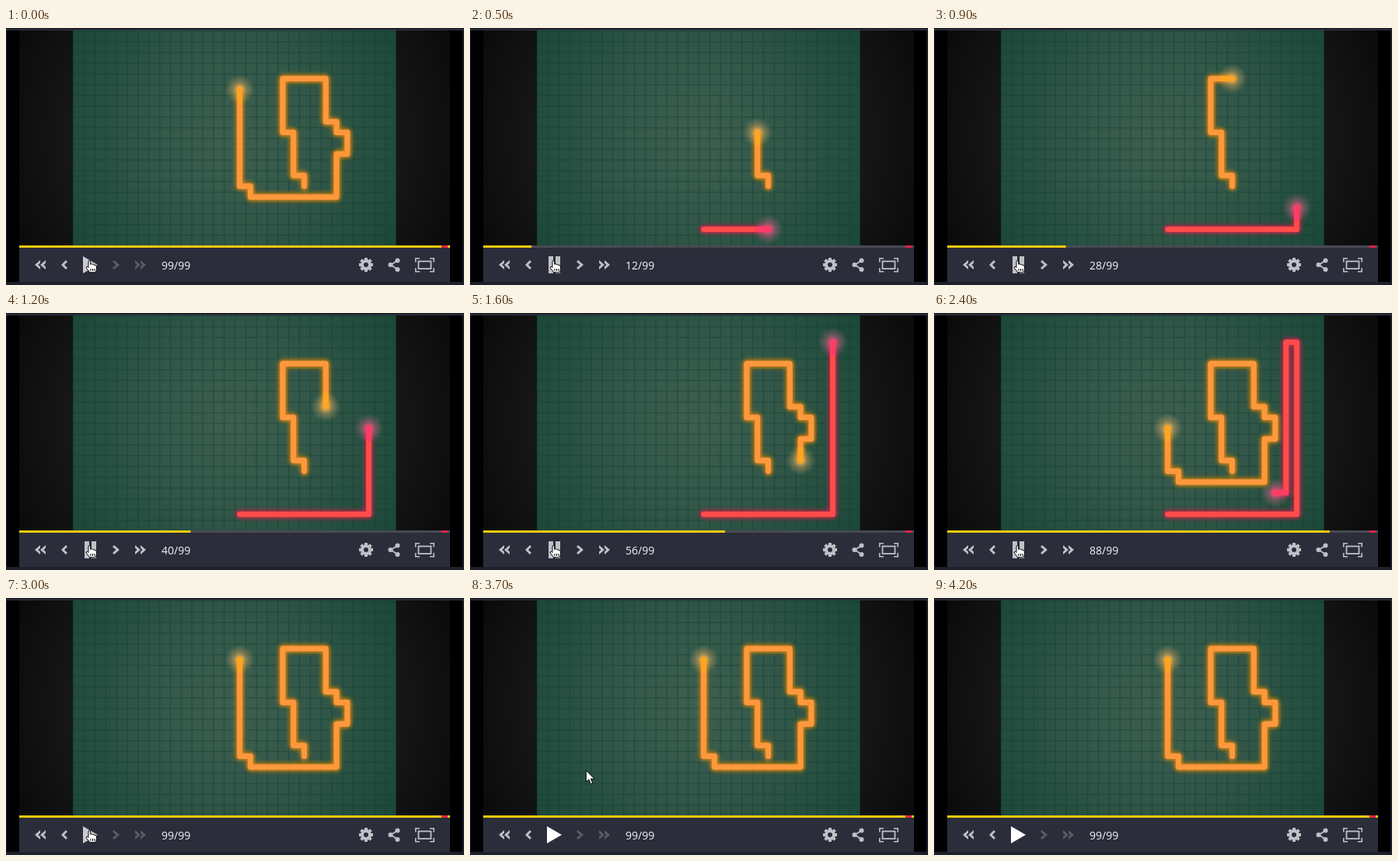
Recreate the animation shown at these times as an HTML page. Size 589 by 331 pixels, loop 4.6 s.

```html
<!DOCTYPE html>
<html lang="en">
<head>
<meta charset="utf-8">
<title>Light trails replay</title>
<style>
  html, body { margin: 0; width: 100%; height: 100%; overflow: hidden; background: #1d1f29; }
  svg { display: block; width: 589px; height: 331px; }
  text { font: 14px "Open Sans", "Noto Sans", sans-serif; fill: #f4f4f6; }
  .trail { fill: none; stroke-width: 7; stroke-linecap: round; stroke-linejoin: round; }
</style>
</head>
<body>
<svg viewBox="0 0 589 331" xmlns="http://www.w3.org/2000/svg">
  <defs>
    <radialGradient id="board" gradientUnits="userSpaceOnUse" cx="293" cy="141" r="250">
      <stop offset="0" stop-color="#3d5f50"/>
      <stop offset=".45" stop-color="#325748"/>
      <stop offset="1" stop-color="#1b4839"/>
    </radialGradient>
    <radialGradient id="wings" gradientUnits="userSpaceOnUse" cx="293" cy="141" r="300">
      <stop offset=".65" stop-color="#191919"/>
      <stop offset="1" stop-color="#0b0b0b"/>
    </radialGradient>
    <pattern id="cells" patternUnits="userSpaceOnUse" x="86" y="3" width="13.84" height="13.85">
      <path d="M0 .8H13.84M.8 0V13.85" stroke="#0d3b30" stroke-opacity=".42" stroke-width="1.6"/>
    </pattern>
    <radialGradient id="haloA">
      <stop offset="0" stop-color="#ffc45c" stop-opacity=".8"/>
      <stop offset=".45" stop-color="#ecb668" stop-opacity=".4"/>
      <stop offset="1" stop-color="#d8b070" stop-opacity="0"/>
    </radialGradient>
    <radialGradient id="haloB">
      <stop offset="0" stop-color="#ff5c8c" stop-opacity=".8"/>
      <stop offset=".45" stop-color="#e66890" stop-opacity=".4"/>
      <stop offset="1" stop-color="#c87088" stop-opacity="0"/>
    </radialGradient>
    <filter id="blur" filterUnits="userSpaceOnUse" x="17" y="3" width="554" height="277">
      <feGaussianBlur stdDeviation="2.8"/>
    </filter>
    <clipPath id="view"><rect x="17" y="3" width="554" height="277"/></clipPath>
  </defs>

  <rect width="589" height="331" fill="#1d1f29"/>
  <rect y="2" width="589" height="1" fill="#363945"/>
  <rect x="1" y="3" width="586" height="324" fill="#000"/>
  <rect x="17" y="3" width="554" height="277" fill="url(#wings)"/>
  <rect x="86" y="3" width="415.5" height="277" fill="url(#board)"/>
  <rect x="86" y="3" width="415.5" height="277" fill="url(#cells)"/>

  <g id="trails" clip-path="url(#view)"></g>

  <rect x="17" y="280" width="554" height="47" fill="#2b2e3a"/>
  <rect x="17" y="280" width="554" height="3" fill="#484a52"/>
  <rect id="bar" x="17" y="280" height="3" fill="#f2ca0c"/>
  <rect x="560" y="280" width="8" height="3" fill="#e3204d"/>

  <g id="back">
    <path d="M44 299L37 305L44 311V307.5L41.5 305L44 302.5ZM51 299L44 305L51 311V307.5L48.5 305L51 302.5Z"/>
    <path d="M77 299L71 305L77 311L79 309L75 305L79 301Z"/>
  </g>
  <g id="forth">
    <path d="M139 299L146 305L139 311L137 309L141.5 305L137 301Z"/>
    <path d="M173 299L180 305L173 311V307.5L175.5 305L173 302.5ZM166 299L173 305L166 311V307.5L168.500 305L166 302.500Z"/>
  </g>
  <path id="play" d="M99 294L118 305L99 316Z"/>
  <path id="pause" d="M101 294h6v22h-6zM110 294h6v22h-6z" fill="#bfc1c7"/>
  <text id="count" x="200" y="311"></text>

  <g fill="none" stroke="#bfc1c7">
    <circle cx="463" cy="305" r="5" stroke-width="4"/>
    <g id="teeth" stroke-width="4"></g>
    <path d="M503.500 299.500L495 305L503.500 311" stroke-width="1.800"/>
    <path d="M526.800 301.500V296.800H532M545 296.800H550.200V301.500M550.200 309V313.700H545M532 313.700H526.800V309" stroke-width="1.600"/>
    <rect x="530.500" y="300.500" width="16" height="9.500" stroke-width="1.800"/>
  </g>
  <g fill="#bfc1c7">
    <circle cx="494.500" cy="305" r="3"/>
    <circle cx="503.500" cy="299.500" r="3"/>
    <circle cx="503.500" cy="311" r="3"/>
  </g>

  <g stroke="#000" fill="#fff" stroke-linejoin="round">
    <path id="hand" d="M106 307.500V301Q106 299.500 107.300 299.500T108.700 301V304.300Q110.800 303.200 111.500 304.800Q113.300 304 114 305.500Q116.500 305 116.500 307.500V310.500Q116.500 312.500 115 314.800H107.500Q106.500 312.500 103.600 309.600Q102.500 307.800 104 307.300Q105 307.100 106 308.500ZM109 310V313M111.500 310V313M114 310V313"/>
    <path id="arrow" d="M0 0V15L3.500 11.800L6 17.500L8.500 16.400L6 11H11Z"/>
  </g>
</svg>

<script>
const LOOP = 4600, STEP = 100, TURNS = 99;
const NS = "http://www.w3.org/2000/svg";
const $ = id => document.getElementById(id);
const show = (el, on) => el.setAttribute("visibility", on ? "visible" : "hidden");

function add(parent, tag, attrs) {
  const el = document.createElementNS(NS, tag);
  for (const key in attrs) el.setAttribute(key, attrs[key]);
  return parent.appendChild(el);
}

// Expands moves such as "U4 R2" into one board cell per move.
function walk(x, y, moves) {
  const dirs = { U: [0, -1], D: [0, 1], L: [-1, 0], R: [1, 0] };
  const cells = [[x, y]];
  for (const move of moves.split(" ")) {
    const [dx, dy] = dirs[move[0]];
    for (let i = +move.slice(1); i > 0; i--) cells.push([x += dx, y += dy]);
  }
  return cells.map(([cx, cy]) => [86 + (cx + .5) * 13.84, 3 + (cy + .5) * 13.85]);
}

function makeTrail(cells, color, glow, tip, halo) {
  const group = add($("trails"), "g", {});
  const line = (stroke, more) => add(group, "polyline", { class: "trail", stroke, ...more });
  const aura = line(glow, { filter: "url(#blur)", style: "stroke-width:11", opacity: .85 });
  const light = add(group, "circle", { r: 19, fill: `url(#${halo})` });
  const body = line(color);
  const head = line(tip);
  return (length, opacity) => {
    const path = cells.slice(0, length + 1);
    const [x, y] = path[path.length - 1];
    // A repeated last point keeps the round cap of a one-cell trail.
    const points = [...path, [x, y]].join(" ");
    aura.setAttribute("points", points);
    body.setAttribute("points", points);
    head.setAttribute("points", [...path.slice(-2), [x, y]].join(" "));
    light.setAttribute("cx", x);
    light.setAttribute("cy", y);
    group.setAttribute("opacity", opacity);
  };
}

const red = makeTrail(walk(15, 18, "R12 U16 L1 D14 L1 U4"),
  "#ff4c4a", "#d5204c", "#ff3c66", "haloB");
const orange = makeTrail(walk(21, 14, "U1 L1 U4 L1 U5 R4 D4 R1 D1 R1 D2 L1 D4 L8 U1 L1 U9"),
  "#ff983c", "#e88a08", "#ffa522", "haloA");

for (let i = 0; i < 8; i++)
  add($("teeth"), "path", { d: "M463 299.500V296", transform: `rotate(${i * 45} 463 305)` });

function turnAt(t) {
  if (t < 300 || t >= 2800) return TURNS;
  if (t < 400) return 1;
  return Math.min(96, 8 + (t - 400) / 25);
}

function draw(now) {
  const t = Math.floor(now % LOOP / STEP) * STEP;
  const turn = turnAt(t);
  const ended = turn === TURNS;
  const length = Math.floor(turn / 2);

  orange(length, 1);
  red(length, !ended ? 1 : t < 2800 ? 0 : Math.max(0, (3000 - t) / 300));

  $("bar").setAttribute("width", 554 * (turn - 1) / (TURNS - 1));
  $("count").textContent = `${turn}/${TURNS}`;
  $("back").setAttribute("fill", turn === 1 ? "#5a5d67" : "#bfc1c7");
  $("forth").setAttribute("fill", ended ? "#5a5d67" : "#bfc1c7");

  const hover = t < 3600;
  show($("play"), ended);
  show($("pause"), !ended);
  $("play").setAttribute("fill", hover ? "#c8cacf" : "#fff");

  const p = Math.min(1, Math.max(0, (t - 3500) / 600));
  const ease = p * p * (3 - 2 * p);
  show($("hand"), hover);
  show($("arrow"), !hover && t < 4200);
  $("arrow").setAttribute("transform", `translate(${107 + 163 * ease} ${300 - 301 * ease})`);
}

const start = performance.now();
function tick() {
  draw(performance.now() - start);
  requestAnimationFrame(tick);
}
tick();
</script>
</body>
</html>
```
